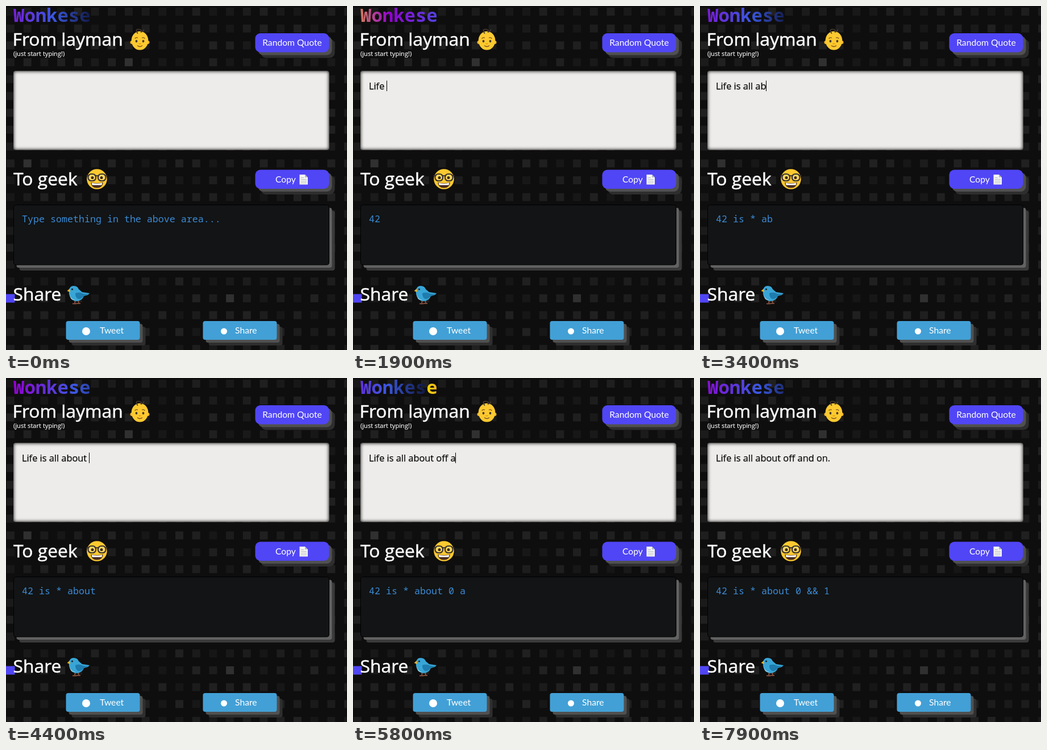
An HTML page that plays this animation: 600 by 606 pixels, repeating every 8 s.

```html
<!DOCTYPE html>
<html lang="en">
<head>
<meta charset="utf-8">
<title>Layman to geek</title>
<style>
  html, body { margin: 0; width: 100%; height: 100%; overflow: hidden; background: #0f0e0e; }
  svg { display: block; width: 600px; height: 606px; }
  text { white-space: pre; }
  .head { font: 31.8px "Open Sans", "Noto Sans", sans-serif; fill: #fff; stroke: #fff; stroke-width: .5; }
  .note { font: 11.15px "Open Sans", "Noto Sans", sans-serif; fill: #fff; stroke: #fff; stroke-width: .15; }
  .label { font: 15.7px Lato, sans-serif; fill: #fff; }
  .typed { font: 16.35px "Open Sans", "Noto Sans", sans-serif; fill: #0a0a0a; stroke: #0a0a0a; stroke-width: .25; }
  .code { font: 16.67px "Noto Sans Mono", monospace; fill: #3c8ad4; }
  .logo { font: bold 32.3px "Noto Sans Mono", monospace; fill: url(#rainbow); }
</style>
</head>
<body>
<svg viewBox="0 0 600 606">
  <defs>
    <linearGradient id="rainbow" gradientUnits="userSpaceOnUse" spreadMethod="repeat" y1="0" y2="0">
      <stop offset="0" stop-color="#ffd700"/>
      <stop offset=".333" stop-color="#9400d3"/>
      <stop offset=".74" stop-color="#3a58e1"/>
      <stop offset="1" stop-color="#0e1538"/>
    </linearGradient>
    <filter id="blur"><feGaussianBlur stdDeviation="3.4"/></filter>
    <clipPath id="inputArea"><rect x="13" y="114.500" width="555.500" height="139" rx="4"/></clipPath>
  </defs>
  <g id="tiles"></g>
  <g id="boxes"></g>

  <g clip-path="url(#inputArea)">
    <rect x="13" y="114" width="556" height="140" fill="#edecea"/>
    <rect x="3" y="104.500" width="575.500" height="159" rx="12" fill="none" stroke="#000" stroke-width="20" filter="url(#blur)"/>
  </g>

  <text class="logo" x="13" y="28">Wonkese</text>
  <text class="head" x="11.500" y="69.500">From layman</text>
  <text class="note" x="13" y="88">(just start typing!)</text>
  <text class="head" x="13" y="316">To geek</text>
  <text class="head" x="12.500" y="518.500">Share</text>
  <text class="label" x="503.500" y="70" text-anchor="middle">Random Quote</text>
  <text class="label" x="474" y="311">Copy</text>
  <text class="label" x="165" y="577">Tweet</text>
  <text class="label" x="403" y="577">Share</text>
  <circle cx="141" cy="573" r="7" fill="#fff"/>
  <circle cx="383.500" cy="573" r="5.500" fill="#fff"/>

  <!-- page icon -->
  <path d="M516.500 297h9.500l5 5v12.500h-14.500z" fill="#f4f4f4"/>
  <path d="M526 297v5h5z" fill="#b5bcc2"/>
  <path d="M519 302.500h5m-5 3h10m-10 3h10m-10 3h10" stroke="#a3abb1" stroke-width=".8"/>

  <!-- baby -->
  <g transform="translate(235.500 60)">
    <circle cx="-14" cy="4" r="3" fill="#f0b52a"/>
    <circle cx="14" cy="4" r="3" fill="#f0b52a"/>
    <ellipse cy="1" rx="14.800" ry="16.500" fill="#fcc930"/>
    <path d="M-4-12q-5-7 2-7 6 0 4 5M2-14q4-1 5-4" fill="none" stroke="#4a3a32" stroke-width="1.700" stroke-linecap="round"/>
    <g fill="#4a3a32">
      <ellipse cx="-6" cy="2" rx="1.900" ry="2.300"/>
      <ellipse cx="6" cy="2" rx="1.900" ry="2.300"/>
    </g>
    <path d="M-8.500-3q2-2 4.500-1M8.500-3q-2-2-4.500-1M-4 10q4 3 8 0" fill="none" stroke="#7a4b22" stroke-width="1.300" stroke-linecap="round"/>
    <path d="M-2 6q2 1.500 4 0" fill="none" stroke="#e59600" stroke-width="1.500"/>
  </g>

  <!-- face with glasses -->
  <g transform="translate(160 305)">
    <circle r="17.800" fill="#fcc930"/>
    <path d="M-11 5.500q11 3 22 0q-1 10-11 10t-11-10z" fill="#4b2d20"/>
    <path d="M-9.500 6.500q9.500 2.500 19 0l-1 4h-17z" fill="#fff"/>
    <g fill="#fcd75c" stroke="#3a3230" stroke-width="2.200">
      <rect x="-15.500" y="-9" width="13.500" height="12" rx="5.500"/>
      <rect x="2" y="-9" width="13.500" height="12" rx="5.500"/>
      <path d="M-3-5q3-2 6 0M-18.500-6h4M14.500-6h4" fill="none"/>
    </g>
    <circle cx="-8" cy="-2.500" r="2.500" fill="#3a2a22"/>
    <circle cx="8" cy="-2.500" r="2.500" fill="#3a2a22"/>
  </g>

  <!-- bird -->
  <path d="M122 518l-1 5.500m-4 1h7m3-7l1 5.500m-4 1h7" fill="none" stroke="#a0604a" stroke-width="1.500"/>
  <path d="M111 501q1-8 8-8 7 0 9 6l6 5 13 2-3 3-7 2q-3 8-12 9-9 0-12-8-3-5-2-11z" fill="#38a5d6"/>
  <path d="M122 506q7-3 14 1l9 1-8 3q-5 6-10 5-5-2-5-10z" fill="#1f7cae"/>
  <path d="M111.500 506q2 11 11 12-10 2-11-12z" fill="#9bd4ea"/>
  <path d="M112 498l-4.500 4 5.500 2z" fill="#f0b429"/>
  <circle cx="116.500" cy="499" r="1.600" fill="#1c2226"/>

  <text class="typed" id="typed" x="28" y="147"></text>
  <rect id="caret" y="131.500" width="1" height="18.500" fill="#000"/>
  <text class="code" id="code" x="28" y="381"></text>
</svg>
<script>
const LOOP = 8000, STEP = 100;
const SENTENCE = 'Life is all about off and on.';
const GEEK = { Life: '42', all: '*', off: '0', and: '&&', on: '1' };
// typing bursts: first key, last key, number of keys
const BURSTS = [[1200, 1850, 5], [2000, 3350, 9], [3500, 4050, 4], [4700, 5750, 5], [5850, 6500, 5], [7300, 7300, 1]];
const TILE = 29.7, SWEEP = 272, SPEED = 0.2386;
const $ = id => document.getElementById(id);

const rect = (x, y, w, h, r, fill, extra = '') =>
  `<rect x="${x}" y="${y}" width="${w}" height="${h}" rx="${r}" fill="${fill}" ${extra}/>`;

const raised = (x, y, w, h, r, fill, near, far, extra) =>
  rect(x + 10, y + 10, w, h, r, far) + rect(x + 5, y + 5, w, h, r, near) + rect(x, y, w, h, r, fill, extra);

function drawTiles() {
  let seed = 11, out = '';
  const random = () => (seed = seed * 16807 % 2147483647) / 2147483647;
  const bright = ['7,3', '1,9', '13,17'];
  for (let row = 0; row < 21; row++)
    for (let col = 0; col < 21; col++) {
      const alpha = bright.includes(col + ',' + row) ? 0.14 : 0.03 + 0.05 * random();
      out += rect(1 + col * TILE, 3 + row * TILE, 14, 14, 0, `rgba(255,255,255,${alpha.toFixed(3)})`);
    }
  $('tiles').innerHTML = out + rect(0, 507.5, 15.5, 15, 0, '#5046f5');
}

function drawBoxes() {
  const shade = ['#505050', '#2e2e2e'];
  $('boxes').innerHTML =
    raised(438.5, 48, 130, 33.5, 9, '#5046f5', ...shade) +
    raised(438.5, 288.5, 130, 33.5, 9, '#5046f5', ...shade) +
    raised(105.5, 555, 130, 33, 4, '#42a0d6', ...shade) +
    raised(346.5, 555, 130, 33, 4, '#42a0d6', ...shade) +
    raised(13.5, 350.5, 555, 105.5, 4, '#121415', '#626262', '#3a3a3a', 'stroke="#000"');
}

const keyTimes = BURSTS.flatMap(([from, to, n]) =>
  Array.from({ length: n }, (_, i) => from + (to - from) * i / Math.max(1, n - 1)));

const translate = text =>
  text.split(' ').map(word => GEEK[word.replace('.', '')] || word).join(' ');

function draw(t) {
  const count = keyTimes.filter(k => k <= t).length;
  const text = SENTENCE.slice(0, count);
  $('typed').textContent = text;
  $('code').textContent = text ? translate(text) : 'Type something in the above area...';

  const caretOn = count > 0 && (t - keyTimes[count - 1]) % 1000 < 500;
  $('caret').setAttribute('visibility', caretOn ? 'visible' : 'hidden');
  if (caretOn) $('caret').setAttribute('x', Math.floor(28 + $('typed').getComputedTextLength()));

  const start = 155 - SPEED * t;
  $('rainbow').setAttribute('x1', start);
  $('rainbow').setAttribute('x2', start + SWEEP);
}

function tick() {
  draw(Math.floor(performance.now() % LOOP / STEP) * STEP);
  requestAnimationFrame(tick);
}

drawTiles();
drawBoxes();
tick();
</script>
</body>
</html>
```
